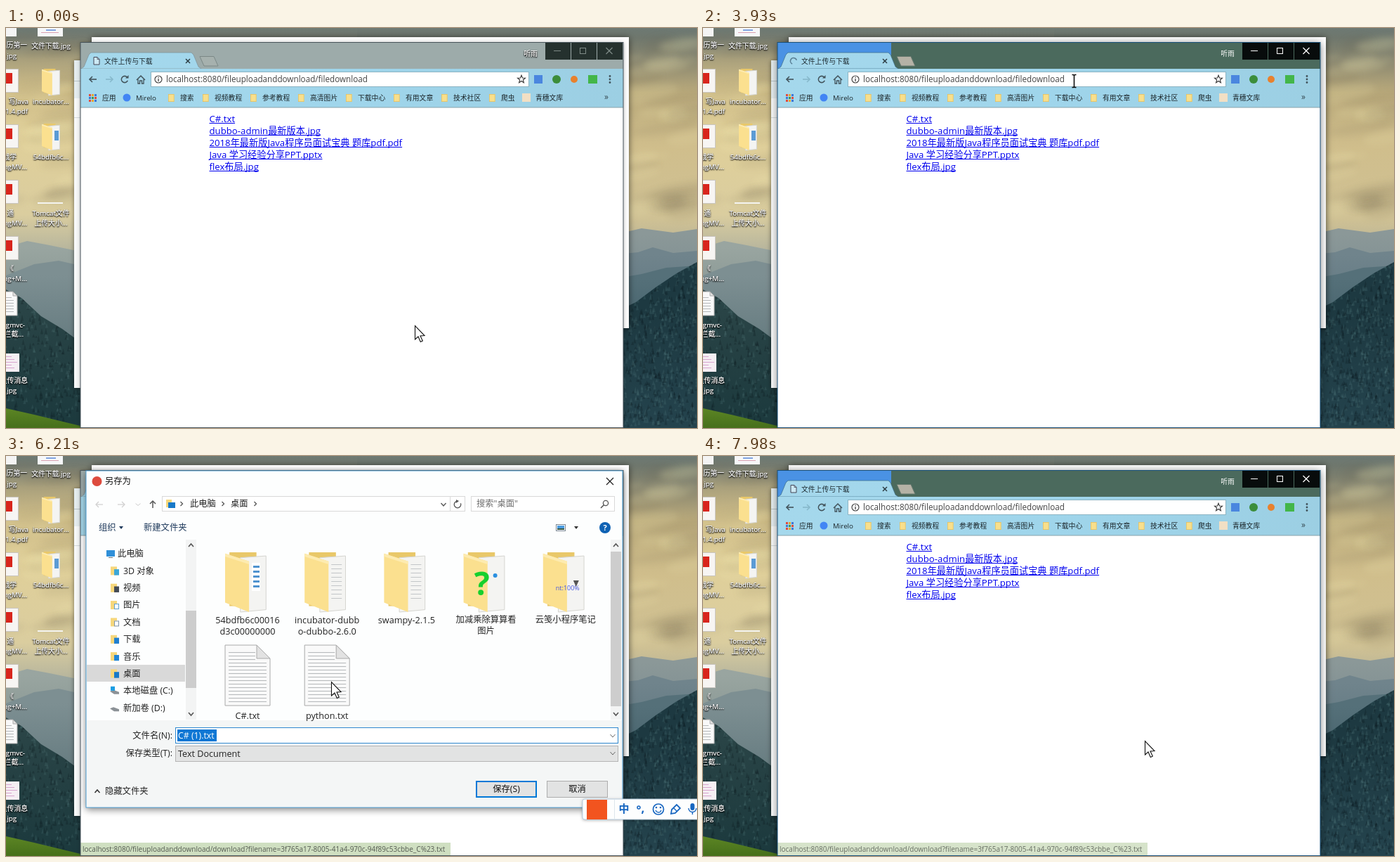
These frames come from a looping animation (984 by 569 pixels, 8000 ms). An HTML page with a canvas:

```html
<!DOCTYPE html>
<html lang="zh">
<head>
<meta charset="utf-8">
<title>文件上传与下载</title>
<style>
html, body { margin: 0; width: 100%; height: 100%; overflow: hidden; background: #66756f; }
canvas { display: block; }
</style>
</head>
<body>
<canvas id="stage" width="984" height="569"></canvas>
<script>
const W = 984, H = 569, LOOP = 8000;
const stage = document.getElementById('stage');
let c = stage.getContext('2d');
const FONT = '"Open Sans", "Noto Sans CJK SC", "Noto Sans CJK", sans-serif';

// ---------- helpers ----------
function box(x, y, w, h, fill, stroke, lw = 1) {
  if (fill) { c.fillStyle = fill; c.fillRect(x, y, w, h); }
  if (stroke) {
    c.strokeStyle = stroke; c.lineWidth = lw;
    c.strokeRect(x + lw / 2, y + lw / 2, w - lw, h - lw);
  }
}
function dot(x, y, r, fill) {
  c.fillStyle = fill; c.beginPath(); c.arc(x, y, r, 0, 7); c.fill();
}
function trace(pts) {
  c.beginPath();
  for (let i = 0; i < pts.length; i += 2) c.lineTo(pts[i], pts[i + 1]);
}
function poly(pts, fill, stroke, lw = 1) {
  trace(pts); c.closePath();
  if (fill) { c.fillStyle = fill; c.fill(); }
  if (stroke) { c.strokeStyle = stroke; c.lineWidth = lw; c.stroke(); }
}
function line(pts, color, lw = 1) {
  trace(pts); c.strokeStyle = color; c.lineWidth = lw; c.stroke();
}
function ring(x, y, r, color, lw = 1, a = 0, b = 7) {
  c.beginPath(); c.arc(x, y, r, a, b); c.strokeStyle = color; c.lineWidth = lw; c.stroke();
}
// y is the middle of the capitals
function text(s, x, y, size, color, align = 'left', weight = 400) {
  c.font = `${weight} ${size}px ${FONT}`;
  c.textAlign = align; c.fillStyle = color;
  c.fillText(s, x, Math.round(y + size * 0.36));
  return c.measureText(s).width;
}
function chevron(x, y, dx, dy, color = '#555', lw = 1.3) {
  if (dy) line([x - 3.5, y - dy * 2, x, y + dy * 2, x + 3.5, y - dy * 2], color, lw);
  else line([x - dx * 1.5, y - 3, x + dx * 1.5, y, x - dx * 1.5, y + 3], color, lw);
}
function arrow(x, y, dx, dy, color, lw = 1.5) {
  const n = 5;
  line([x - dx * n, y - dy * n, x + dx * n, y + dy * n], color, lw);
  const tx = x + dx * n, ty = y + dy * n;
  line([tx - dx * 4 - dy * 4, ty - dy * 4 - dx * 4, tx, ty, tx - dx * 4 + dy * 4, ty - dy * 4 + dx * 4], color, lw);
}
function cross(x, y, r, color, lw = 1.2) {
  line([x - r, y - r, x + r, y + r], color, lw);
  line([x - r, y + r, x + r, y - r], color, lw);
}
function shadowed(blur, alpha, dy, draw) {
  c.save();
  c.shadowColor = `rgba(0,0,0,${alpha})`; c.shadowBlur = blur; c.shadowOffsetY = dy;
  draw();
  c.restore();
}
let seed = 7;
const rnd = () => (seed = (seed * 16807) % 2147483647) / 2147483647;

// ---------- desktop ----------
function sky(x, w, stops) {
  const g = c.createLinearGradient(0, 0, 0, 340);
  stops.forEach(([p, col]) => g.addColorStop(p, col));
  c.fillStyle = g; c.fillRect(x, 0, w, H);
}
function hill(pts, top, bottom, trees = 0) {
  const last = pts.length - 2;
  const g = c.createLinearGradient(0, pts[1], 0, H);
  g.addColorStop(0, top); g.addColorStop(1, bottom);
  const area = [...pts, pts[last], H, pts[0], H];
  poly(area, g);
  if (!trees) return;
  c.save(); trace(area); c.clip();
  for (let i = 0; i < trees; i++) {
    const x = pts[0] + rnd() * (pts[last] - pts[0]), y = 330 + rnd() * 239, h = 3 + rnd() * 7;
    poly([x, y - h, x + 2, y, x - 2, y], rnd() < 0.5 ? 'rgba(120,160,160,.13)' : 'rgba(0,12,18,.2)');
  }
  c.restore();
}
function clouds(x, w) {
  c.save(); c.filter = 'blur(5px)';
  for (let i = 0; i < 30; i++) {
    const cx = x + rnd() * w, cy = 16 + rnd() * 250;
    c.fillStyle = i % 2 ? 'rgba(255,240,190,.12)' : 'rgba(100,95,70,.09)';
    c.beginPath(); c.ellipse(cx, cy, 18 + rnd() * 40, 4 + rnd() * 9, -0.15, 0, 7); c.fill();
  }
  c.restore();
}
function label(s, x, y, align = 'center') {
  shadowed(2, 1, 1, () => { text(s, x, y, 9.8, '#fff', align); text(s, x, y, 9.8, '#fff', align); });
}
function folder(x, y, w, h, back) {
  box(x + w * 0.1, y, w * 0.62, h * 0.9, '#e9c869');
  poly([x + w * .35, y + h * .09, x + w * .94, y + h * .06, x + w * .94, y + h * .96, x + w * .35, y + h], '#f4f4f2', '#d5d5d0');
  if (back) back();
  poly([x, y + h * .02, x + w * .55, y + h * .15, x + w * .55, y + h, x, y + h * .84], '#fbe08f');
  poly([x, y + h * .02, x + w * .55, y + h * .15, x + w * .55, y + h * .2, x, y + h * .07], '#fdebb0');
}
function page(x, y, w, h, fold, gap) {
  poly([x, y, x + w - fold, y, x + w, y + fold, x + w, y + h, x, y + h], '#f9f9f9', '#a9a9a9');
  poly([x + w - fold, y, x + w - fold, y + fold, x + w, y + fold], '#e2e2e2', '#a9a9a9');
  for (let ly = y + gap * 2; ly < y + h - 4; ly += gap)
    box(x + 5, ly, w - 10 - (ly < y + fold + 3 ? fold - 3 : 0), 1, '#b5b8ba');
}
function desktop() {
  sky(0, 500, [[0, '#6d7973'], [.04, '#757b70'], [.13, '#a9a07c'], [.26, '#cfbd88'], [.5, '#dfcf9a'], [.78, '#dacd9f'], [1, '#a6aa9c']]);
  sky(500, 484, [[0, '#6d7973'], [.04, '#6f776d'], [.14, '#8b8870'], [.27, '#bbab7c'], [.5, '#d0be8c'], [.8, '#cfc194'], [1, '#a9aa98']]);
  clouds(0, 100); clouds(880, 104);
  hill([0, 312, 30, 303, 62, 309, 106, 318], '#99a5a0', '#5d7375');
  hill([0, 352, 40, 336, 75, 331, 106, 338], '#7d8f92', '#49636a');
  hill([0, 372, 22, 384, 50, 410, 80, 428, 106, 447], '#2c4648', '#1b393d', 500);
  hill([0, 541, 40, 550, 106, 566], '#5c8524', '#466f1b');
  hill([870, 293, 905, 285, 950, 291, 984, 286], '#8b9898', '#5b747f');
  hill([870, 322, 900, 319, 921, 312, 950, 320, 984, 317], '#70848c', '#405d69');
  hill([870, 356, 905, 350, 940, 341, 984, 338], '#557079', '#2b4a55');
  hill([870, 403, 897, 390, 925, 369, 955, 349, 984, 333], '#1d3941', '#24434d', 900);

  box(-4, 0, 19, 12, '#f4f4f4');
  [58, 137, 216, 296].forEach(y => {
    box(-8, y, 26, 34, '#f7f5f3', '#c9c5c0');
    box(-6, y + 6, 15, 15, '#d8251c');
  });
  page(-10, 375, 26, 34, 6, 4);
  box(-8, 463, 27, 26, '#f5eef3');
  for (let i = 0; i < 5; i++) box(0, 467 + i * 4, 8 + i % 3 * 4, 1, '#d8a6cf');
  label('历第一', 30, 24, 'right'); label('.jpg', 15, 39, 'right');
  label('写Java', 32, 104, 'right'); label('1.4.pdf', 31, 118, 'right');
  label('战学', 15, 183, 'right'); label('ngMV...', 30, 197, 'right');
  label('通', 11, 263, 'right'); label('ngMV...', 30, 277, 'right');
  label('《', 11, 342, 'right'); label('ng+M...', 30, 356, 'right');
  label('gmvc-', 27, 422, 'right'); label('拦截...', 25, 435, 'right');
  label('上传消息', 31, 501, 'right'); label('.jpg', 15, 515, 'right');

  box(45, 0, 36, 12, '#f6f7f9'); box(57, 2, 14, 2, '#7fa3e0'); box(50, 6, 25, 1, '#d9a0b0');
  label('文件下载.jpg', 64, 25);
  folder(51, 58, 27, 38); label('incubator...', 64, 104);
  folder(51, 136, 27, 38, () => box(69, 146, 6, 14, '#5b9bd5')); label('54bdfb6c...', 64, 183);
  box(45, 248, 36, 2, '#f4f4f0');
  label('Tomcat文件', 64, 263); label('上传大小...', 64, 277);

  shadowed(6, .5, 1, () => box(97, 46, 200, 466, '#f9fafa'));
  box(97, 46, 9, 54, '#e6eef0'); box(97, 75, 9, 1, '#b9c4c7'); box(97, 127, 9, 1, '#d5dbdd');
  shadowed(9, .6, 1, () => box(122, 13, 765, 414, '#fdfdfd'));
}

// ---------- browser ----------
const links = ['C#.txt', 'dubbo-admin最新版本.jpg', '2018年最新版Java程序员面试宝典 题库pdf.pdf', 'Java 学习经验分享PPT.pptx', 'flex布局.jpg'];
const marks = [['搜索', 235], ['视频教程', 284], ['参考教程', 352], ['高清图片', 420], ['下载中心', 488], ['有用文章', 556], ['技术社区', 624], ['爬虫', 692]];
const HOST = 'localhost:8080/fileuploadanddownload/';

function browser(s) {
  const { active } = s;
  shadowed(active ? 11 : 6, active ? .5 : .3, active ? 2 : 1, () => box(106, 20, 773, 549, '#fff'));
  box(106, 20, 773, 38, active ? '#4b6a5d' : '#9dabaa');
  if (active) box(106, 20, 162, 38, '#4a92e4');
  const bar = c.createLinearGradient(106, 0, 879, 0);
  bar.addColorStop(0, '#a5d8ec'); bar.addColorStop(.5, '#9fd5eb'); bar.addColorStop(1, '#9ccfe3');
  poly([107, 58, 111, 55, 118, 38, 121, 35, 264, 35, 267, 38, 274, 55, 278, 58], bar, active ? '#3c6c86' : '#7d9097', .7);
  box(106, 58, 773, 55, bar);
  box(106, 112.5, 773, 1, '#8aa3ab');
  poly([276, 40.5, 296, 40.5, 302, 54, 282, 54], active ? '#b5b2a6' : '#a6b1ae', active ? '#67796f' : '#7b8886');

  if (s.loading) ring(129, 47, 4.5, '#5a7f95', 1.6, 2, 6);
  else {
    poly([125, 41.5, 130, 41.5, 133, 44.5, 133, 52, 125, 52], '#cdeaf5', '#445');
    line([130, 41.5, 130, 44.5, 133, 44.5], '#445', .8);
  }
  text('文件上传与下载', 140, 47, 9.8, '#1d2a30');
  cross(259, 47, 3, '#2b3a40', 1.4);
  if (active) text('听雨', 747, 36, 9.8, '#fff', 'center');
  else label('听雨', 747, 36);

  const ink = active ? '#fff' : '#7f8b87', cap = active ? '#080c0c' : '#25312e';
  [768, 805, 842].forEach(x => box(x, 21, 36, 24, cap));
  line([780, 32.5, 790, 32.5], ink); box(817, 28, 9, 9, null, ink); cross(859, 32.5, 4.5, ink);

  // toolbar
  const g = '#41525a';
  arrow(124, 73, -1, 0, g, 1.6); arrow(147, 73, 1, 0, '#86b8cb', 1.6);
  ring(169, 73, 4.6, g, 1.6, .4, 5.6); poly([170, 71.5, 174.5, 71.5, 174.5, 67], g);
  line([186, 74, 192, 68, 198, 74], g, 1.5); line([188, 73, 188, 79, 190.5, 79, 190.5, 75, 193.5, 75, 193.5, 79, 196, 79, 196, 73], g, 1.3);
  box(206, 62, 539, 22, '#fff', '#8cb4c3');
  ring(217, 73, 5, '#444', 1.2); box(216.4, 72, 1.3, 4, '#444'); box(216.4, 69.7, 1.3, 1.3, '#444');
  if (s.selected) box(228, 66, 288, 15, '#0f77d4');
  text(HOST + 'filedownload', 228, 73, 11.7, s.selected ? '#fff' : '#444');
  const star = [];
  for (let i = 0; i < 10; i++) {
    const r = i % 2 ? 2.5 : 5.8, a = i * Math.PI / 5 - Math.PI / 2;
    star.push(734 + r * Math.cos(a), 73 + r * Math.sin(a));
  }
  poly(star, null, '#333', 1.1);
  box(752, 67, 12, 12, '#4a86df'); dot(784, 73, 6, '#3c8d3a'); dot(809, 73, 5, '#e8812d'); box(829, 67, 13, 12, '#43b649');
  [68.5, 73, 77.5].forEach(y => dot(860, y, 1.4, g));

  // bookmarks
  const hues = ['#e34a3c', '#3e9b52', '#3c78d8', '#e9a52b'];
  for (let i = 0; i < 9; i++) box(118 + i % 3 * 4, 94 + (i / 3 | 0) * 4, 3, 3, hues[(i * 3 + (i / 3 | 0)) % 4]);
  const mark = (s, x) => text(s, x, 99.5, 9.8, '#1b2529');
  mark('应用', 137); dot(172, 99, 5.5, '#4285f4'); mark('Mirelo', 185);
  marks.forEach(([s, x]) => { box(x - 4, 94, 8.5, 11, '#f8df8c', '#e0bd5e', .7); mark(s, x + 13); });
  box(735, 93, 12, 12, '#f2dfc4'); mark('青穗文库', 754);
  text('»', 852, 98, 12, '#33454c');

  if (!s.blank) links.forEach((l, i) => {
    const y = 129 + i * 17, col = i == 0 && s.pressed ? '#f00' : '#00e';
    const w = text(l, 289.5, y, 13.2, col);
    box(289.5, y + 6, w, 1, col);
  });
  if (s.status) {
    c.globalAlpha = s.status;
    const long = s.full;
    box(106, 550, long ? 527 : 256, 18, '#cfdfc1');
    text(HOST + (long ? 'download?filename=3f765a17-8005-41a4-970c-94f89c53cbbe_C%23.txt' : 'download?fi...'), 109, 559, 10, '#555b52');
    c.globalAlpha = 1;
  }
  box(105.5, 20, 774, 549, null, active ? '#174f79' : '#46535a');
}

// ---------- save dialog ----------
const tree = ['此电脑', '3D 对象', '视频', '图片', '文档', '下载', '音乐', '桌面', '本地磁盘 (C:)', '新加卷 (D:)'];
const folders = [['54bdfb6c00016', 'd3c00000000'], ['incubator-dubb', 'o-dubbo-2.6.0'], ['swampy-2.1.5'], ['加减乘除算算看', '图片'], ['云笺小程序笔记']];

function pcIcon(x, y) {
  box(x - 6, y - 5, 12, 9, '#2f8fd8'); box(x - 3, y + 5, 6, 1, '#6b7680');
}
function treeIcon(i, x, y) {
  if (i == 0) return pcIcon(x, y);
  if (i > 7) {
    poly([x - 7, y + 1, x - 2, y - 1, x + 6, y + 2, x + 6, y + 5, x - 1, y + 5], '#8b9196');
    if (i == 8) box(x - 6, y - 6, 6, 6, '#1b9de2');
    return;
  }
  box(x - 6, y - 6, 9, 12, '#f6d77c');
  const hue = ['#3aa7d8', '#444b55', '#5f9fd0', '#7d93a8', '#1f7fd0', '#1f86d8', '#1879c8'][i - 1];
  box(x - 1, y - 2, 7, 8, i == 3 || i == 4 ? '#fff' : hue, hue);
}
function fileIcons() {
  folders.forEach((names, i) => {
    const x = 344 + i * 113.2;
    folder(x - 32, 137, 62, 85, () => {
      if (i == 0) { box(x + 6, 152, 12, 40, '#fff'); for (let k = 0; k < 5; k++) box(x + 8, 156 + k * 7, 9, 3, '#4f93cf'); }
      else if (i < 3) for (let k = 0; k < 9; k++) box(x + 6, 154 + k * 6, 15, 1, '#c3c6c8');
    });
    if (i == 3) { text('?', x - 6, 181, 46, '#16d02d', 'center', 700); dot(x + 13, 170, 3, '#2a8fe0'); }
    if (i == 4) { text('nt:100%', x - 14, 188, 9, '#4556e0'); poly([x + 11, 177, x + 19, 177, x + 15, 186], '#555'); }
    names.forEach((n, k) => text(n, x, 233 + k * 16, i > 2 ? 12.3 : 12.7, '#222', 'center'));
  });
  ['C#.txt', 'python.txt'].forEach((n, i) => {
    const x = 344 + i * 113.2;
    page(x - 32, 269, 64, 86, 19, 5);
    text(n, x, 369, 12.7, '#222', 'center');
  });
}
function button(s, x, main, hover) {
  box(x, 462, 87, 24, hover ? '#cce4f7' : '#e2e3e3', main ? '#0078d7' : '#adadad', main ? 2 : 1);
  text(s, x + 43.5, 474, 12.3, '#111', 'center');
}
function controls(s) {
  arrow(133, 69, -1, 0, '#cfcfcf', 1.2); arrow(164, 69, 1, 0, '#cfcfcf', 1.2);
  chevron(188, 69, 0, .7, '#ccc', 1); arrow(209, 69, 0, -1, '#555');
  box(222, 57, 432, 22, '#fff', '#d9d9d9'); box(632, 58, 1, 20, '#d9d9d9');
  box(228, 62, 8, 11, '#f6d77c'); box(231, 66, 10, 8, '#1879c8');
  [250, 309, 355].forEach(x => chevron(x, 68, 1, 0));
  text('此电脑', 262, 68, 12.3, '#222'); text('桌面', 320, 68, 12.3, '#222');
  chevron(623, 69, 0, 1); ring(643, 69, 4.8, '#555', 1.3, -.4, 4.6); poly([641, 62, 645, 64, 641, 67], '#555');
  box(662, 57, 205, 22, '#fff', '#d9d9d9'); text('搜索"桌面"', 670, 68, 12.3, '#6d6d6d');
  ring(854, 67, 3.6, '#555', 1.3); line([851.5, 69.5, 847, 74], '#555', 1.6);
  text('组织', 132, 102, 12.3, '#1e395b'); poly([161, 100, 167, 100, 164, 104], '#1e395b');
  text('新建文件夹', 196, 102, 12.3, '#1e395b');
  box(783, 97, 14, 10, '#fff', '#7c8894'); box(785, 99, 10, 4, '#4a9be0'); box(785, 103, 10, 2, '#3b5a44');
  poly([809, 100, 815, 100, 812, 104], '#333');
  dot(853, 102, 8, '#0f62b4'); text('?', 853, 102, 11, '#fff', 'center', 700);

  box(115, 297, 140, 24, '#d9d9d9');
  tree.forEach((n, i) => {
    const y = 139 + i * 24.35;
    treeIcon(i, i ? 155 : 149, y);
    text(n, i ? 167 : 159, y, 12.3, '#222');
  });

  box(115, 376, 762, 123, '#f4f6f6');
  text('文件名(N):', 237, 398, 12.3, '#222', 'right');
  box(241, 386, 631, 23, '#fff', '#2f88cf');
  if (!s.cancel) box(244, 389, 56, 17, '#0f77d4');
  text('C# (1).txt', 245, 397.5, 12.3, s.cancel ? '#222' : '#fff');
  text('保存类型(T):', 237, 423, 12.3, '#222', 'right');
  box(241, 412, 631, 23, '#e2e3e3', '#b5b5b5');
  text('Text Document', 245, 423, 12.6, '#222');
  chevron(864, 398, 0, 1, '#666', 1); chevron(864, 423, 0, 1, '#666', 1);
  chevron(130, 477, 0, -1, '#333', 1.5); text('隐藏文件夹', 141, 477, 12.3, '#222');
  button('保存(S)', 669, !s.cancel); button('取消', 770, s.cancel, s.cancel);
}
function dialog(s) {
  c.save();
  if (s.opening) {
    c.globalAlpha = .9;
    c.translate(496, 260); c.scale(.9935, .9935); c.translate(-496, -260);
  }
  // keep the shadow outside, so that it does not show through the fading panel
  c.save();
  c.beginPath(); c.rect(0, 0, W, H); c.rect(114, 21, 764, 479); c.clip('evenodd');
  shadowed(10, .5, 3, () => box(114, 21, 764, 479, '#fff'));
  c.restore();
  box(114, 21, 764, 479, '#fdfefe');
  if (s.opening) box(114, 21, 764, 92, 'rgba(253,254,254,.4)');
  c.globalAlpha = 1;
  dot(129.5, 36, 7, '#dd4b3e');
  text('另存为', 141, 36, 12.3, '#111');
  cross(860, 36, 5, '#222');
  if (s.ready) controls(s);
  [[256, 220, 110], [861, 136, 220]].forEach(([x, y, h], i) => {
    if (s.ready) box(x, 119, 15, 256, '#f3f4f4');
    box(x, y, 15, h, s.ready ? '#cdcdcd' : '#d3d4d4');
    if (i && !s.ready) return;
    chevron(x + 7.5, 127, 0, -1, '#555', 1.6); chevron(x + 7.5, 367, 0, 1, '#555', 1.6);
  });
  if (s.files) fileIcons();
  else text('正在处理...', 576, 142, 12.3, '#555', 'center');
  box(113.5, 20.5, 765, 480, null, '#4b9bd0');
  c.restore();
}
function inputBar() {
  const b = '#1766c0';
  shadowed(4, .35, 1, () => { c.fillStyle = '#fdfefe'; c.beginPath(); c.roundRect(821, 488, 175, 29, 3); c.fill(); });
  c.strokeStyle = '#b9cfe0'; c.lineWidth = 1; c.stroke();
  box(827, 489, 29, 28, '#f2541f');
  box(866, 489, 1, 27, '#dde6ec');
  text('中', 880, 502, 15, b, 'center', 700);
  ring(901, 500, 2, b, 1.5); text(',', 907, 501, 17, b, 'center', 700);
  ring(929, 502.5, 7.5, b, 1.7); dot(926, 500, 1.3, b); dot(932, 500, 1.3, b); ring(929, 503, 4, b, 1.4, .2, 2.9);
  poly([947, 509, 948, 503, 955, 496, 960, 501, 953, 508], null, b, 1.8); line([951, 501, 955, 505], b, 1.5);
  c.fillStyle = b; c.beginPath(); c.roundRect(974.5, 494, 6, 10, 3); c.fill();
  ring(977.5, 501, 5.5, b, 1.4, 0, Math.PI); line([977.5, 506, 977.5, 510], b, 1.5);
}

// ---------- pointer ----------
function pointer(kind, x, y) {
  c.save(); c.translate(x, y);
  if (kind == 'beam') {
    c.translate(.5, 0);
    line([-3, -8.5, -1, -8.5, 0, -7.5, 1, -8.5, 3, -8.5], '#111', 1.4);
    line([0, -8, 0, 9], '#111', 1.6);
    line([-3, 9.5, -1, 9.5, 0, 8.5, 1, 9.5, 3, 9.5], '#111', 1.4);
  } else if (kind == 'hand') {
    poly([-1.5, 1, 0, 0, 1.5, 1, 1.5, 6, 4, 6, 5, 7, 7, 7, 8, 8, 10, 8.5, 10.5, 10, 10, 14, 8, 19, 0, 19, -2, 15, -5, 11, -4.5, 9.5, -3, 9.5, -1.5, 11.5], '#fff', '#111', 1.1);
    line([4.5, 7, 4.5, 11], '#111', .8); line([7.5, 8, 7.5, 11], '#111', .8);
  } else {
    poly([.5, .5, .5, 20, 5, 16, 8.3, 23.5, 11.3, 22, 8, 15, 14, 14.5], '#fff', '#111', 1.1);
  }
  c.restore();
}
const path = [
  [0, 582, 423, 'arrow'], [270, 582, 423, 'arrow'], [1060, 457, 190, 'arrow'], [1200, 457, 190, 'arrow'],
  [1728, 328, 136, 'hand'], [1861, 314, 126, 'hand'], [1990, 370, 106, 'arrow'], [2120, 440, 80, 'beam'],
  [2260, 480, 75, 'beam'], [2520, 530, 74, 'beam'], [3900, 530, 74, 'beam'], [4040, 505, 92, 'arrow'],
  [4440, 430, 120, 'arrow'], [4690, 330, 134, 'arrow'], [4830, 306, 132, 'hand'], [5110, 306, 132, 'arrow'],
  [5520, 452, 241, 'arrow'], [6600, 470, 371, 'arrow'], [7298, 769, 496, 'arrow'],
  [7710, 800, 470, 'arrow'], [7980, 629, 405, 'arrow'], [8100, 629, 405, 'arrow']
];
function pointerAt(t) {
  let i = 0;
  while (path[i + 1][0] <= t) i++;
  const [t0, x0, y0, kind] = path[i], [t1, x1, y1] = path[i + 1];
  const p = (t - t0) / (t1 - t0);
  return [kind, Math.round(x0 + (x1 - x0) * p), Math.round(y0 + (y1 - y0) * p)];
}

const bursts = [[400, 1060, 6], [1330, 2260, 8], [2380, 2800, 4], [3510, 4440, 8], [4560, 5520, 8], [5640, 6600, 8], [6750, 7710, 8], [7830, 7980, 2]];
function snap(t) {
  let s = 0;
  for (const [a, b, n] of bursts) {
    if (t < a) break;
    const step = (b - a) / (n - 1);
    s = t >= b ? b : a + Math.floor((t - a) / step) * step;
  }
  return s;
}
const within = (t, a, b) => t >= a && t < b;

const wall = document.createElement('canvas');
wall.width = W; wall.height = H;
const screen = c;
c = wall.getContext('2d');
desktop();
c = screen;

function draw(now) {
  const t = snap(now % LOOP);
  const open = within(t, 5515, 7825);
  c.drawImage(wall, 0, 0);
  browser({
    active: t >= 2515 && !open,
    selected: within(t, 2515, 3640),
    loading: within(t, 3640, 4040),
    blank: within(t, 3770, 3900),
    pressed: within(t, 4960, 5100),
    full: t >= 5780,
    status: within(t, 1855, 1990) ? .4 : t >= 7975 ? .85 : t >= 4830 ? 1 : 0
  });
  if (open) {
    dialog({ opening: t < 5640, ready: t >= 5770, files: t >= 6050, cancel: t >= 7710 });
    inputBar();
  }
  pointer(...pointerAt(t));
}
function tick() {
  draw(performance.now());
  requestAnimationFrame(tick);
}
tick();
</script>
</body>
</html>
```
